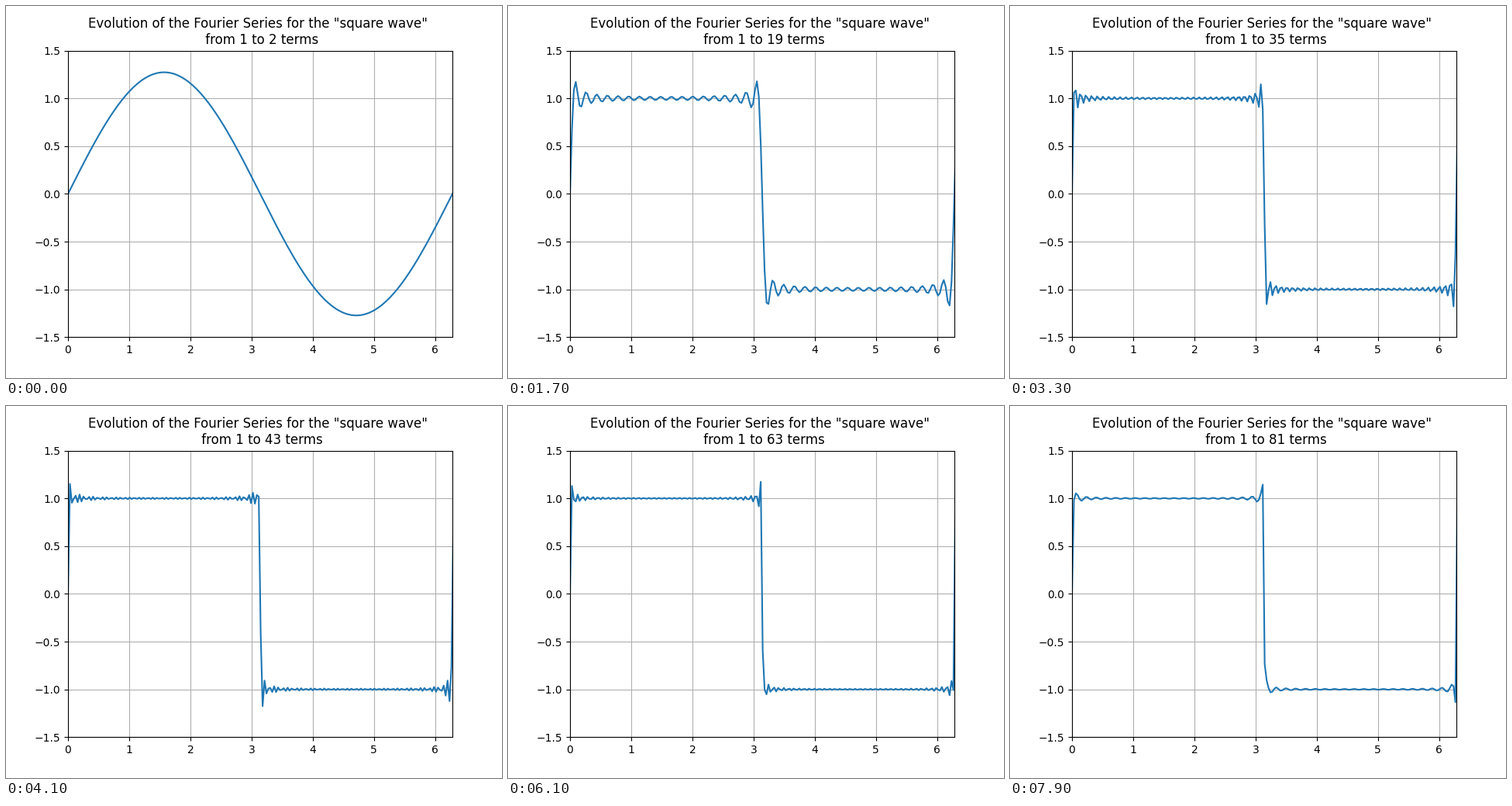
Write a matplotlib script that moves like this. It is 640 px wide and 480 px high and loops after 8 s.

```python
import numpy as np
import matplotlib.pyplot as plt
from matplotlib.animation import FuncAnimation

FRAMES = 80
INTERVAL = 100

x = np.linspace(0, 4 * np.pi, 400)


def square_series(count):
    """Partial Fourier sum of the unit square wave."""
    odd = 2 * np.arange(1, count + 1)[:, None] - 1
    return 4 / np.pi * (np.sin(odd * x) / odd).sum(axis=0)


fig, ax = plt.subplots(figsize=(6.4, 4.8), dpi=100)
line, = ax.plot(x, square_series(1))
ax.set_xlim(0, 2 * np.pi)
ax.set_ylim(-1.5, 1.5)
ax.grid(True)


def update(i):
    line.set_ydata(square_series(i + 1))
    title = ax.set_title(
        'Evolution of the Fourier Series for the "square wave" \n'
        f' from 1 to {i + 2} terms')
    return line, title


anim = FuncAnimation(fig, update, frames=FRAMES, interval=INTERVAL,
                     repeat=True, repeat_delay=0)
plt.show()
```
